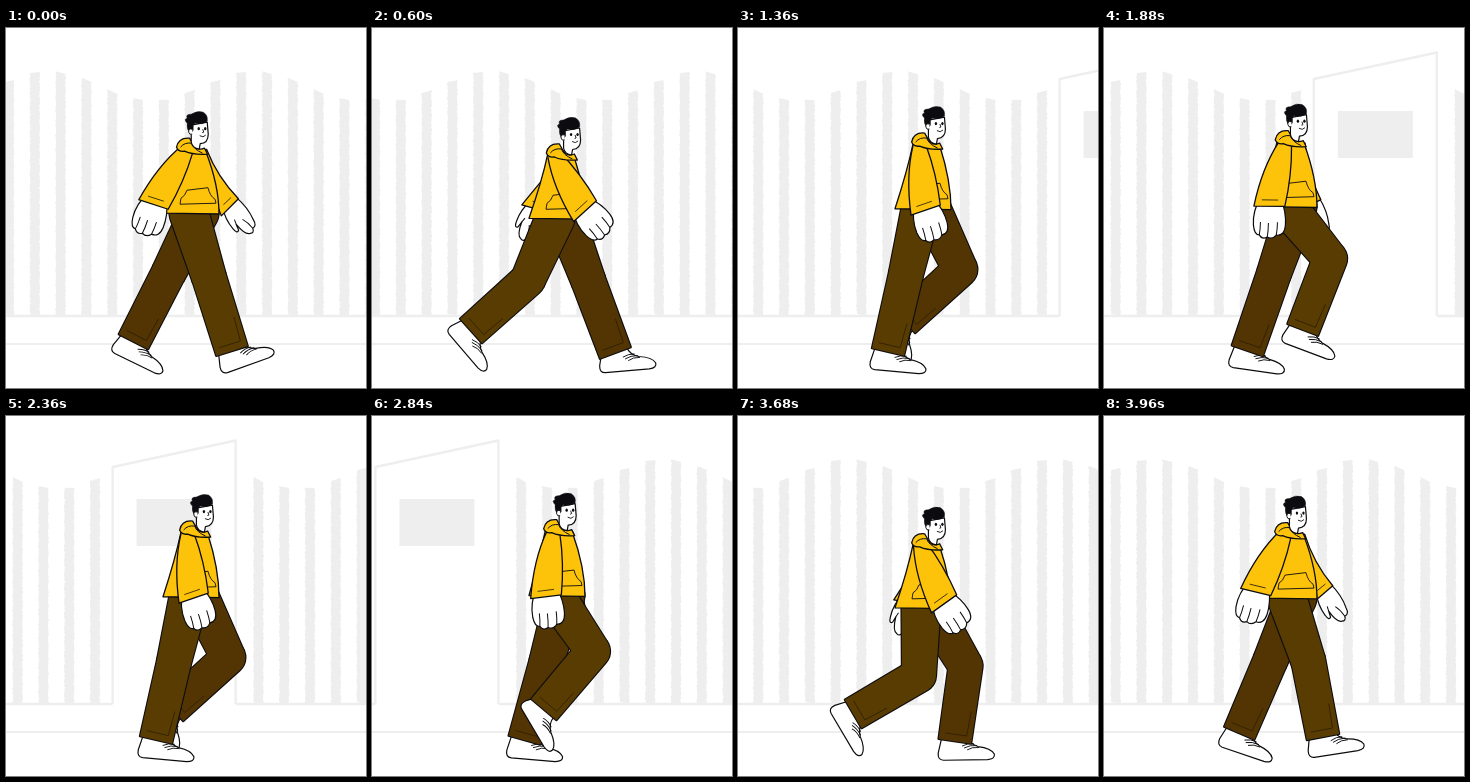
Animation of 360 by 360 pixels, one loop 4 s. Source, as an HTML page with a canvas:

```html
<!DOCTYPE html>
<html lang="en">
<head>
<meta charset="utf-8">
<title>Walk cycle</title>
<style>
html, body { margin: 0; width: 100%; height: 100%; overflow: hidden; background: #fff; }
canvas { display: block; width: 360px; height: 360px; }
</style>
</head>
<body>
<canvas id="stage"></canvas>
<script>
const canvas = document.getElementById('stage');
const ctx = canvas.getContext('2d');
const dpr = window.devicePixelRatio || 1;
canvas.width = canvas.height = 360 * dpr;

const LOOP = 4000, STEP = 40, CYCLE = 1000, WORLD = 860;
const YELLOW = '#fdc30b', BROWN = '#593c02', SHADE = '#533504', INK = '#0c0c10', PALE = '#eeeeee';
const THIGH = 67.5, SHIN = 76.3;
const TAU = Math.PI * 2;

// One stride, shared by both legs: time, ankle x, ankle y, foot angle
const STRIDE = [
  [0, 226, 323, -21], [80, 243, 325, -6], [360, 150, 324, 4], [500, 131, 315, 22],
  [600, 99, 303, 48], [830, 167, 293, 62], [885, 201, 303, 16], [960, 219, 321, -10]
];

const wave = (t, peak, period = CYCLE) => Math.cos((t - peak) / period * TAU);

// Smooth periodic interpolation through the stride
function footAt(phase) {
  const t = (phase + 2 * CYCLE) % CYCLE, n = STRIDE.length;
  const time = i => STRIDE[(i + n) % n][0] + CYCLE * Math.floor(i / n);
  const val = (i, c) => STRIDE[(i + n) % n][c];
  let i = n - 1;
  while (STRIDE[i][0] > t) i--;
  const span = time(i + 1) - time(i), u = (t - time(i)) / span;
  const slope = (j, c) => (val(j + 1, c) - val(j - 1, c)) / (time(j + 1) - time(j - 1)) * span;
  return [1, 2, 3].map(c => {
    const m = slope(i, c), k = slope(i + 1, c), d = val(i + 1, c) - val(i, c);
    return val(i, c) + u * (m + u * (3 * d - 2 * m - k + u * (m + k - 2 * d)));
  });
}

function shape(d, fill, width = 1.3, ink = INK) {
  const p = new Path2D(d);
  if (fill) { ctx.fillStyle = fill; ctx.fill(p); }
  if (width) { ctx.lineWidth = width; ctx.strokeStyle = ink; ctx.stroke(p); }
}

function at(x, y, deg, draw) {
  ctx.save();
  ctx.translate(x, y);
  ctx.rotate(deg * Math.PI / 180);
  draw();
  ctx.restore();
}

function line(points, width) {
  ctx.lineWidth = width;
  ctx.beginPath();
  for (const [x, y] of points) ctx.lineTo(x, y);
  ctx.stroke();
}

const fenceTop = x => 57.5 - 14.6 * wave(x, 42, 206.4);

function roughStripe(x, seed) {
  const wob = (y, s) => 0.5 * Math.sin(y * 1.3 + s) + 0.3 * Math.sin(y * 0.47 + s * 3);
  const right = x + 9.7;
  ctx.beginPath();
  for (let y = fenceTop(x); y < 288; y += 2) ctx.lineTo(x + wob(y, seed), y);
  for (let y = 288; y > fenceTop(right); y -= 2) ctx.lineTo(right + wob(y, seed + 2), y);
  ctx.fill();
}

function street(x0) {
  at(x0, 0, 0, () => {
    ctx.fillStyle = ctx.strokeStyle = PALE;
    for (let k = -4; k < 24; k++) roughStripe(25.8 * k - 1.8, k * 1.7);
    line([[-123, 288], [614, 288]], 2.6);
    line([[614, 288], [614, 51], [737, 24.5], [737, 288]], 2.4);
    ctx.fillRect(638, 83, 75, 47);
  });
}

function background(t) {
  const shift = t / LOOP * WORLD;
  street(-shift);
  street(WORLD - shift);
  ctx.strokeStyle = PALE;
  line([[0, 316], [360, 316]], 2);
}

function shoe() {
  shape('M-13-4L-17 11Q-18 18-12 18.5L32 19.5Q40 19 39 14Q36 8 23 6Q14 3 12-4Z', '#fff', 1.2);
  shape('M7 5Q13 2 19 3M9 7Q15 4 22 5M12 9Q17 6 24 7', null, 0.9);
}

// Tapered tube with a round start
function limb(path, x1, y1, r1, x2, y2, r2) {
  const a = Math.atan2(y2 - y1, x2 - x1), nx = -Math.sin(a), ny = Math.cos(a);
  path.moveTo(x2 - nx * r2, y2 - ny * r2);
  path.lineTo(x2 + nx * r2, y2 + ny * r2);
  path.arc(x1, y1, r1, a + Math.PI / 2, a + Math.PI * 1.5);
  path.closePath();
}

function leg(hx, hy, phase, color) {
  const [ax, ay, turn] = footAt(phase);
  // the knee follows from hip and ankle, bending forward
  const dx = ax - hx, dy = ay - hy, d = Math.hypot(dx, dy);
  const along = d < THIGH + SHIN ? (d * d + THIGH ** 2 - SHIN ** 2) / (2 * d) : d * 0.47;
  const out = Math.sqrt(Math.max(0, THIGH ** 2 - along ** 2)) * (d < THIGH + SHIN);
  const kx = hx + (dx * along + dy * out) / d, ky = hy + (dy * along - dx * out) / d;

  at(ax, ay, turn, shoe);
  const thigh = new Path2D(), shin = new Path2D();
  limb(thigh, hx, hy, 19.5, kx, ky, 17);
  limb(shin, kx, ky, 17, ax, ay, 16.5);
  ctx.strokeStyle = INK;
  ctx.lineWidth = 2.2;
  ctx.stroke(thigh);
  ctx.stroke(shin);
  ctx.fillStyle = color;
  ctx.fill(thigh);
  ctx.fill(shin);
  const tilt = Math.atan2(ay - ky, ax - kx) * 180 / Math.PI - 90;
  at(ax, ay, tilt, () => shape('M-11-7L11-7M11-7L12-32', null, 0.7, '#2a1c00'));
}

function hand() {
  shape('M-9-8Q-17 6-16 20Q-15 30-10 30Q-7 35-2 32Q3 35 7 30Q15 31 16 20Q17 8 11-8Z', '#fff', 1.2);
  shape('M-10 30Q-9 24-9 17M-2 32Q-1 26-1 18M7 30Q8 24 8 17', null, 1);
}

function farHand() {
  shape('M-7-8Q-12 6-10 18Q-9 25-6 22L-5 16Q-3 30 2 31Q6 33 7 28Q12 28 12 21Q14 8 9-8Z', '#fff', 1.2);
  shape('M7 28Q6 20 3 15M-5 16L-4 11', null, 1);
}

function sleeve() {
  const edge = 'M-7 0Q-17 30-15 69L15 61.5Q14 30 6 1';
  shape(edge, YELLOW, 0);
  shape(edge, null);
  shape('M-9 61L7 57', null, 0.7);
}

function farSleeve() {
  shape('M-6 0L-13 66L10 58.5Q1 30 4 0Z', YELLOW);
  shape('M-6 57L4 54', null, 0.7);
}

function arm(x, y, deg, wristTurn, drawHand, drawSleeve) {
  at(x, y, -deg, () => {
    at(0, 64, -wristTurn, drawHand);
    drawSleeve();
  });
}

function torso(hx, hd, hp) {
  const lx = 173 + hx * 0.5, rx = 200 + hx * 0.4, sy = 120 + hd, hem = 187 + hp;
  shape(`M${lx} ${sy}Q${lx - 6} ${sy + 28} 157 ${hem}L213 ${hem + 0.8}Q213 ${hem - 28} ${rx} ${sy + 3}Z`, YELLOW);
  at(-2, hp, 0, () => shape('M176 178L177 172Q181 170 183 164L204 161.5Q206 170 211 173L212 177L176 178', null, 0.9));
}

function hood() {
  shape('M171 119Q173 109 184 110L188 117Q192 123 199 120L202 126Q188 127 179 123Q173 124 171 119Z', YELLOW);
  shape('M175 119Q179 114 186 115Q188 121 197 125', null, 1);
}

function head() {
  shape('M186 97L186 114Q187 120 194 121L195 115.5Q203 115 203 106L202 94Z', '#fff', 1.2);
  shape('M185 106Q181 100 182 95Q178 91 182 90Q180 86 186 86Q192 82 198 84Q203 87 202 93Q197 97 190 95L188 97L188 102Z', INK, 0.5);
  shape('M187 101Q183 100 183.5 104Q184 107 187 106', '#fff', 0.9);
  ctx.fillStyle = INK;
  for (const x of [193.5, 200]) {
    ctx.beginPath();
    ctx.ellipse(x, 100.5, 1.2, 1.6, 0, 0, TAU);
    ctx.fill();
  }
  shape('M197.5 101L198.5 104L197 104.5M194.5 107.5Q198 110 200.5 107', null, 0.9);
}

function walker(t) {
  // the far leg runs half a stride behind, a little unevenly
  const farPhase = t - 510 - 25 * wave(t, 430);
  const bounce = wave(farPhase, 141, CYCLE / 2);
  const hd = 0.5 + 7.8 * bounce, hp = -1.5 + 6.8 * bounce;
  const hx = 2.6 - 3.4 * wave(t, 20);
  const swing = 32 * wave(t, 70);

  arm(197, 123 + hd, swing - 2, 5, farHand, farSleeve);
  leg(193, 187 + hp, farPhase, SHADE);
  leg(183, 187 + hp, t, BROWN);
  torso(hx, hd, hp);
  arm(182, 121 + hd * 0.8, -3 - swing, 14, hand, sleeve);
  at(hx * 0.6, hd, 0, hood);
  at(hx, hd, 0, head);
}

function frame(now) {
  const t = Math.floor((now % LOOP) / STEP) * STEP;
  ctx.setTransform(dpr, 0, 0, dpr, 0, 0);
  ctx.fillStyle = '#fff';
  ctx.fillRect(0, 0, 360, 360);
  ctx.lineJoin = 'round';
  background(t);
  walker(t % CYCLE);
}

const start = performance.now();
function tick() {
  frame(performance.now() - start);
  requestAnimationFrame(tick);
}
tick();
</script>
</body>
</html>
```
